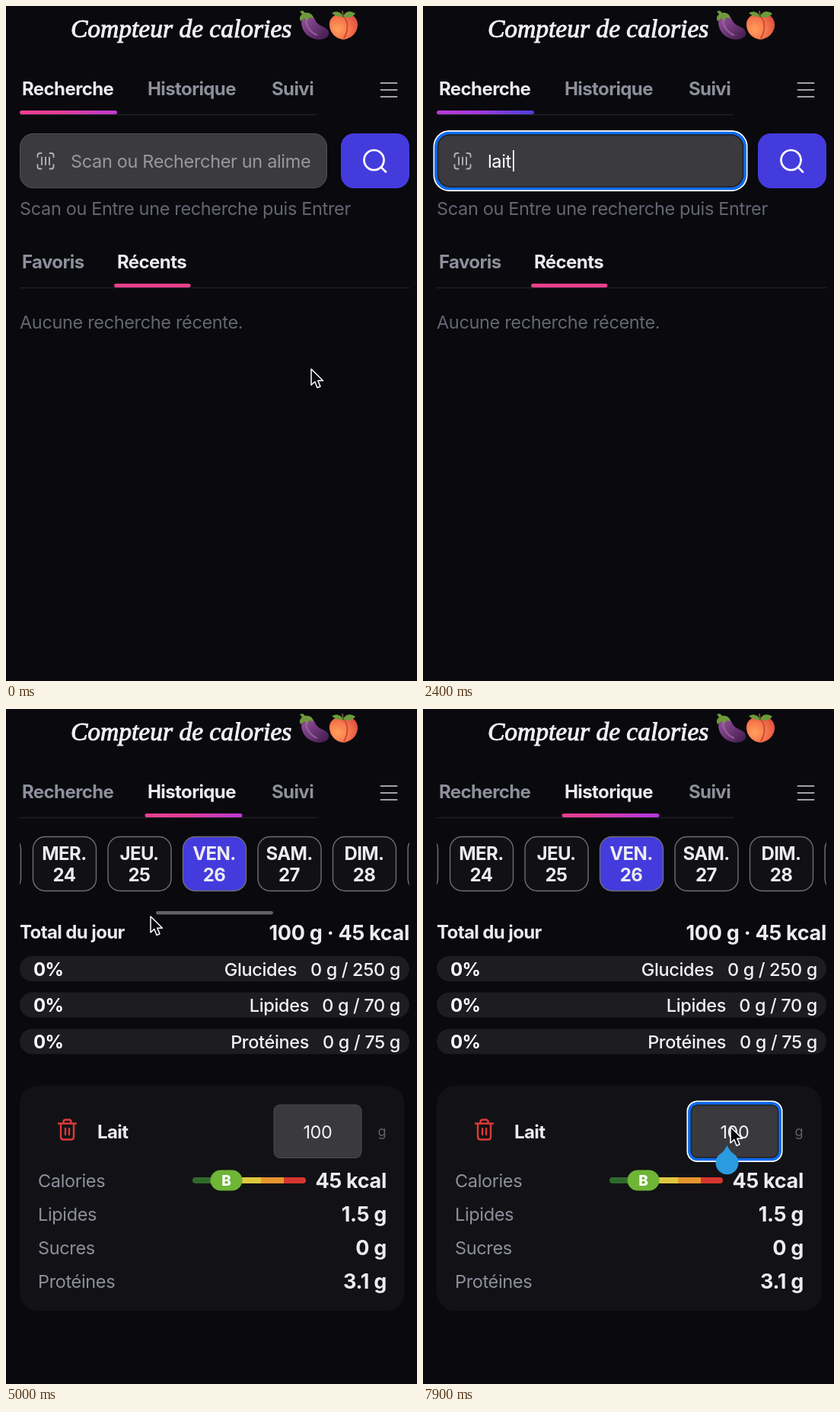
Recreate the animation shown at these times as an HTML page. Size 540 by 885 pixels, loop 8 s.

```html
<!DOCTYPE html>
<html lang="fr">
<head>
<meta charset="utf-8">
<title>Compteur de calories</title>
<style>
html, body { margin: 0; width: 100%; height: 100%; overflow: hidden; background: #09090e; }
svg { display: block; }
#stage { width: 100%; height: 100%; }
text { font: 400 23.5px Inter, sans-serif; letter-spacing: -.35px; fill: #8d909b; white-space: pre; }
.title { font: italic 400 33.5px "Liberation Serif", serif; letter-spacing: 0; fill: #f0f0f2; stroke: #f0f0f2; stroke-width: 1; }
.bold { font-weight: 700; font-size: 24px; letter-spacing: -.6px; }
.on { fill: #ececf0; }
.white { fill: #fff; }
.dim { fill: #646772; }
.value { font-weight: 700; font-size: 27px; letter-spacing: -.3px; fill: #ececf0; text-anchor: end; }
.goal { font-weight: 500; fill: #f2f2f4; text-anchor: end; }
.mid { text-anchor: middle; }
.line { fill: none; stroke-linecap: round; stroke-linejoin: round; }

/* Hard switches */
.search, .history, .hint, .result, .panel, .holder, .typed, .caret, .focus, .pick, .drop, .arrow, .beam, .hand {
  animation: 8s step-end infinite;
}
.search { animation-name: search; }
.history { animation-name: history; }
.hint { animation-name: hint; }
.result { animation-name: result; }
.panel { animation-name: panel; }
.holder { animation-name: holder; }
.typed { animation-name: typed; }
.caret { animation-name: caret; }
.focus { animation-name: focus; }
.pick { animation-name: pick; }
.drop { animation-name: drop; }
.arrow { animation-name: arrow; }
.beam { animation-name: beam; }
.hand { animation-name: hand; }
@keyframes search { 0% { opacity: 1 } 57.5%, 100% { opacity: 0 } }
@keyframes history { 0% { opacity: 0 } 57.5%, 100% { opacity: 1 } }
@keyframes hint { 0% { opacity: 1 } 36.25%, 100% { opacity: 0 } }
@keyframes result { 0% { opacity: 0 } 36.25%, 100% { opacity: 1 } }
@keyframes panel { 0% { transform: none } 36.25%, 100% { transform: translateY(297px) } }
@keyframes holder { 0% { opacity: 1 } 21.25%, 100% { opacity: 0 } }
@keyframes typed {
  0% { clip-path: inset(0 100% 0 0) }
  21.25% { clip-path: inset(0 82% 0 0) }
  23.75% { clip-path: inset(0 41% 0 0) }
  26.25% { clip-path: inset(0 24% 0 0) }
  30%, 100% { clip-path: inset(0) }
}
@keyframes caret {
  0% { opacity: 0; transform: translateX(85px) }
  11.25% { opacity: 1; transform: translateX(85px) }
  16.25% { opacity: 0; transform: translateX(85px) }
  21.25% { opacity: 1; transform: translateX(91px) }
  23.75% { opacity: 1; transform: translateX(105px) }
  26.25% { opacity: 1; transform: translateX(110px) }
  30%, 36.25% { opacity: 1; transform: translateX(118px) }
  42.5% { opacity: 0; transform: translateX(118px) }
  48.75% { opacity: 1; transform: translateX(118px) }
  55%, 100% { opacity: 0; transform: translateX(118px) }
}
@keyframes focus { 0% { opacity: 0 } 11.25%, 100% { opacity: 1 } }
@keyframes pick { 0% { opacity: 0 } 81.25%, 100% { opacity: 1 } }
@keyframes drop { 0% { opacity: 0 } 85%, 100% { opacity: 1 } }
@keyframes arrow {
  0% { opacity: 1 } 10% { opacity: 0 } 43.75% { opacity: 1 } 50% { opacity: 0 }
  57.5% { opacity: 1 } 73.75% { opacity: 0 } 85%, 100% { opacity: 1 }
}
@keyframes beam {
  0% { opacity: 0 } 10% { opacity: 1 } 20% { opacity: 0 } 41.25% { opacity: 1 }
  43.75% { opacity: 0 } 73.75% { opacity: 1 } 85%, 100% { opacity: 0 }
}
@keyframes hand { 0% { opacity: 0 } 50% { opacity: 1 } 57.5%, 100% { opacity: 0 } }

/* Continuous motion */
.pointer { animation: pointer 8s ease-in-out infinite; }
.shift { animation: shift 8s ease-in-out infinite; }
.scroll { animation: scroll 8s linear infinite; }
@keyframes pointer {
  0%, 2.5% { transform: translate(401px, 476px) }
  12%, 41.25% { transform: translate(168px, 200px) }
  52%, 57.5% { transform: translate(140px, 502px) }
  62.5%, 64% { transform: translate(190px, 272px) }
  75%, 76.5% { transform: translate(433px, 568px) }
  83%, 85% { transform: translate(410px, 556px) }
  88%, 100% { transform: translate(404px, 548px) }
}
@keyframes shift {
  0%, 2.5% { transform: translateX(0px) }
  16%, 39% { transform: translateX(-128px) }
  54%, 61% { transform: translateX(0px) }
  74%, 80% { transform: translateX(-128px) }
  98.75% { transform: translateX(-24px) }
  100% { transform: translateX(0px) }
}
@keyframes scroll { 0%, 65% { opacity: 1 } 68.75%, 100% { opacity: 0 } }
</style>
</head>
<body>
<svg id="stage" viewBox="0 0 540 885" xmlns="http://www.w3.org/2000/svg">
  <defs>
    <linearGradient id="glow">
      <stop offset="0" stop-color="#ec4090"/>
      <stop offset=".2" stop-color="#e63e97"/>
      <stop offset=".52" stop-color="#b93ad6"/>
      <stop offset=".7" stop-color="#a43bdb"/>
      <stop offset="1" stop-color="#4b40da"/>
    </linearGradient>
    <linearGradient id="plum" x2="1" y2="1">
      <stop offset=".2" stop-color="#8a4a92"/>
      <stop offset="1" stop-color="#3d1948"/>
    </linearGradient>
    <radialGradient id="peach" cx=".3" cy=".6" r=".75">
      <stop offset="0" stop-color="#ffa05c"/>
      <stop offset=".5" stop-color="#f97b4d"/>
      <stop offset="1" stop-color="#dd4f3f"/>
    </radialGradient>
    <clipPath id="pill"><rect width="128" height="5" rx="2.5"/></clipPath>
    <clipPath id="week"><rect x="18" y="160" width="512" height="90"/></clipPath>
    <clipPath id="meter"><rect width="149" height="8" rx="4"/></clipPath>
    <g id="score">
      <g clip-path="url(#meter)">
        <rect width="30" height="8" fill="#2f6a2c"/>
        <rect x="30" width="30" height="8" fill="#6fb536"/>
        <rect x="60" width="30" height="8" fill="#dfc83f"/>
        <rect x="90" width="30" height="8" fill="#e6952f"/>
        <rect x="120" width="30" height="8" fill="#d5372f"/>
      </g>
      <rect x="23.5" y="-9.5" width="42" height="27" rx="13.5" fill="#6fb536"/>
      <text class="mid white" x="44.5" y="11" style="font-size:19px;font-weight:800">B</text>
    </g>
    <rect id="day" width="83" height="71" y="167.5" rx="16" stroke="#6e6e75" stroke-width="1.4"/>
    <rect id="track" x="18" width="512" height="33" rx="16.5" fill="#1c1c21"/>
    <path id="ibeam" d="M-5 -12Q0 -12 0 -8Q0 -12 5 -12M0 -8V8M-5 12Q0 12 0 8Q0 12 5 12M-3 3H3"/>
  </defs>

  <rect width="540" height="885" fill="#09090e"/>

  <!-- Header -->
  <text class="title" x="85" y="41">Compteur de calories</text>
  <g>
    <path d="M391 12C398 8 404 13 407 20C411 27 422 27 424 34C426 42 415 46 405 43C391 39 384 24 391 12Z" fill="url(#plum)"/>
    <path d="M394 20C396 29 401 35 408 38" class="line" stroke="#a872ad" stroke-width="2.5" opacity=".6"/>
    <path d="M386 7L390 6L393 9C399 8 403 11 404 16L398 15L396 20L392 16L387 20C385 16 386 13 389 11Z" fill="#6f9a3c"/>
  </g>
  <g>
    <path d="M443 13C453 7 463 15 462 26C461 37 452 43 443 44C434 43 426 36 425 26C424 15 434 8 443 13Z" fill="url(#peach)"/>
    <path d="M444 14C450 21 450 32 444 42" class="line" stroke="#c8473a" stroke-width="1.8"/>
    <path d="M443 14C437 15 431 12 428 9C434 6 440 7 443 14C446 6 453 6 459 10C455 15 449 16 443 14Z" fill="#6a9b3a"/>
    <path d="M443 14L442 7" class="line" stroke="#79522e" stroke-width="2"/>
  </g>
  <path d="M18 142.5H408" stroke="#202026" stroke-width="1.5"/>
  <path d="M492.5 101H513.5M492.5 110H513.5M492.5 119H513.5" class="line" stroke="#a0a1a9" stroke-width="2"/>
  <text class="bold" x="349" y="116.5">Suivi</text>

  <!-- Search page -->
  <g class="search">
    <text class="bold on" x="21" y="116.5">Recherche</text>
    <text class="bold" x="186" y="116.5">Historique</text>
    <g transform="translate(18 137)" clip-path="url(#pill)">
      <rect class="shift" width="256" height="5" fill="url(#glow)"/>
    </g>

    <rect x="18.5" y="167.5" width="403" height="71" rx="17" fill="#3b3b3f" stroke="#505055"/>
    <g class="focus" fill="none">
      <rect x="14.5" y="164" width="411" height="78" rx="20" stroke="#fff" stroke-width="2"/>
      <rect x="17" y="166.5" width="406" height="73" rx="18" stroke="#0a6cf5" stroke-width="3.5"/>
      <rect x="19.5" y="169" width="401" height="68" rx="16" stroke="#202126" stroke-width="1.5"/>
    </g>
    <path d="M41.5 198V196Q41.5 193 44.5 193H46.5M57.5 193H59.5Q62.5 193 62.5 196V198M62.5 208V210.5Q62.5 213.5 59.5 213.5H57.5M46.5 213.5H44.5Q41.5 213.5 41.5 210.5V208M47 198.5V208M52 198.5V208M57 198.5V208" class="line" stroke="#b0b0b6" stroke-width="1.9"/>
    <text class="holder" x="85" y="212" style="fill:#98989f">Scan ou Rechercher un alime</text>
    <text class="typed white" x="85" y="212">lait</text>
    <rect class="caret" y="189" width="1.7" height="28" fill="#fff"/>
    <rect x="440" y="167" width="90" height="72" rx="17" fill="#443bdd"/>
    <g class="line" stroke="#fff" stroke-width="2.7">
      <circle cx="483.5" cy="202" r="13"/>
      <path d="M493 211.5L499 217.5"/>
    </g>
    <text class="hint dim" x="18" y="274">Scan ou Entre une recherche puis Entrer</text>

    <g class="result">
      <rect x="18" y="257" width="512" height="319" rx="24" fill="#121216"/>
      <text class="bold on" x="42" y="318">Lait</text>
      <text x="93.5" y="318" style="font-size:18.5px;font-weight:600;letter-spacing:0;fill:#646873">(100g)</text>
      <text class="value" x="506" y="306.5">45 kcal</text>
      <use href="#score" x="357" y="322"/>
      <text x="42" y="374">Lipides</text><text class="value" x="506" y="375">1.5 g</text>
      <text x="42" y="418">Sucres</text><text class="value" x="506" y="419">0 g</text>
      <text x="42" y="462">Protéines</text><text class="value" x="506" y="463">3.1 g</text>
      <rect x="42" y="480.5" width="183" height="71.5" rx="17" fill="#443bdd"/>
      <text class="bold white" x="69" y="525.5">Enregistrer</text>
    </g>

    <g class="panel">
      <text class="bold" x="21" y="343.5">Favoris</text>
      <text class="bold on" x="146" y="343.5">Récents</text>
      <path d="M18 369.5H530" stroke="#202026" stroke-width="1.5"/>
      <rect x="142" y="364" width="100.5" height="5" rx="2.5" fill="#e83f8c"/>
      <text class="dim" x="18" y="423">Aucune recherche récente.</text>
    </g>
  </g>

  <!-- History page -->
  <g class="history">
    <text class="bold" x="21" y="116.5">Recherche</text>
    <text class="bold on" x="186" y="116.5">Historique</text>
    <g transform="translate(182.5 137)" clip-path="url(#pill)">
      <rect class="shift" width="256" height="5" fill="url(#glow)"/>
    </g>

    <g clip-path="url(#week)" fill="#111115">
      <use href="#day" x="-63.5"/>
      <use href="#day" x="35.5"/>
      <use href="#day" x="134"/>
      <use href="#day" x="232.5" fill="#443bdd"/>
      <use href="#day" x="331"/>
      <use href="#day" x="429.5"/>
      <use href="#day" x="528"/>
    </g>
    <text class="bold on mid" x="76.5" y="198">MER.</text><text class="bold on mid" x="76.5" y="226">24</text>
    <text class="bold on mid" x="175" y="198">JEU.</text><text class="bold on mid" x="175" y="226">25</text>
    <text class="bold on mid" x="273.5" y="198">VEN.</text><text class="bold on mid" x="273.5" y="226">26</text>
    <text class="bold on mid" x="372" y="198">SAM.</text><text class="bold on mid" x="372" y="226">27</text>
    <text class="bold on mid" x="470.5" y="198">DIM.</text><text class="bold on mid" x="470.5" y="226">28</text>
    <rect class="scroll" x="197" y="265" width="154" height="4.5" rx="2.2" fill="#626267"/>

    <text class="bold on" x="18" y="301">Total du jour</text>
    <text class="value" x="530" y="302.5">100 g · 45 kcal</text>
    <use href="#track" y="324"/>
    <text class="bold white" x="36" y="349.5">0%</text>
    <text class="goal" x="382" y="349.5">Glucides</text><text class="goal" x="518" y="349.5">0 g / 250 g</text>
    <use href="#track" y="371.5"/>
    <text class="bold white" x="36" y="397">0%</text>
    <text class="goal" x="398" y="397">Lipides</text><text class="goal" x="518" y="397">0 g / 70 g</text>
    <use href="#track" y="419.5"/>
    <text class="bold white" x="36" y="445">0%</text>
    <text class="goal" x="398" y="445">Protéines</text><text class="goal" x="518" y="445">0 g / 75 g</text>

    <rect x="18" y="494" width="505.5" height="295" rx="24" fill="#121216"/>
    <path d="M69 543.5H92M72 543.5V561Q72 564.5 75.5 564.5H85.5Q89 564.5 89 561V543.5M75.5 543V541.5Q75.5 538.5 78.5 538.5H82.5Q85.5 538.5 85.5 541.5V543M78 550V558M83 550V558" class="line" stroke="#de3937" stroke-width="2.4"/>
    <text class="bold on" x="120" y="563">Lait</text>
    <rect x="352" y="519" width="115" height="69.5" rx="8" fill="#3a3a3e" stroke="#4c4c51"/>
    <g class="pick" fill="none">
      <rect x="347.5" y="514.5" width="124" height="78.5" rx="13" stroke="#fff" stroke-width="2"/>
      <rect x="350" y="517" width="119" height="73.5" rx="11" stroke="#0a6cf5" stroke-width="3.5"/>
      <rect x="352.5" y="519.5" width="114" height="68.5" rx="8" stroke="#202126" stroke-width="1.5"/>
    </g>
    <text class="mid" x="409.5" y="562.5" style="fill:#f2f2f4">100</text>
    <text x="488.5" y="560" style="font-size:18px;fill:#5f626c">g</text>
    <text x="42" y="626.5">Calories</text><text class="value" x="500" y="627.5">45 kcal</text>
    <use href="#score" x="245" y="614"/>
    <text x="42" y="670.5">Lipides</text><text class="value" x="500" y="671.5">1.5 g</text>
    <text x="42" y="714.5">Sucres</text><text class="value" x="500" y="715.5">0 g</text>
    <text x="42" y="758.5">Protéines</text><text class="value" x="500" y="759.5">3.1 g</text>
    <path class="drop" d="M399.5 572Q402 579 410.5 585A15 15 0 1 1 388.5 585Q397 579 399.5 572Z" fill="#2b9ade"/>
  </g>

  <!-- Pointer -->
  <g class="pointer">
    <path class="arrow" d="M0 0V21L4.8 16.5L8 24.5L12 22.8L8.8 15.2H15.5Z" fill="#08080a" stroke="#fff" stroke-width="1.5" stroke-linejoin="round"/>
    <g class="beam line">
      <use href="#ibeam" stroke="#fff" stroke-width="4"/>
      <use href="#ibeam" stroke="#111" stroke-width="1.6"/>
    </g>
    <g class="hand" stroke="#111" stroke-width="1.3" stroke-linejoin="round">
      <path d="M-2 2Q-1.5 -1 1.5 1L4.5 9Q6 7 8 9Q10 7 11.5 10Q14 9 14.5 12L14.5 18L12 25H3L-5 15Q-6 12 -3 12L1 15Z" fill="#fff"/>
      <path d="M5 16V21M8 16V21M11 16V21" class="line"/>
    </g>
  </g>
</svg>
</body>
</html>
```
